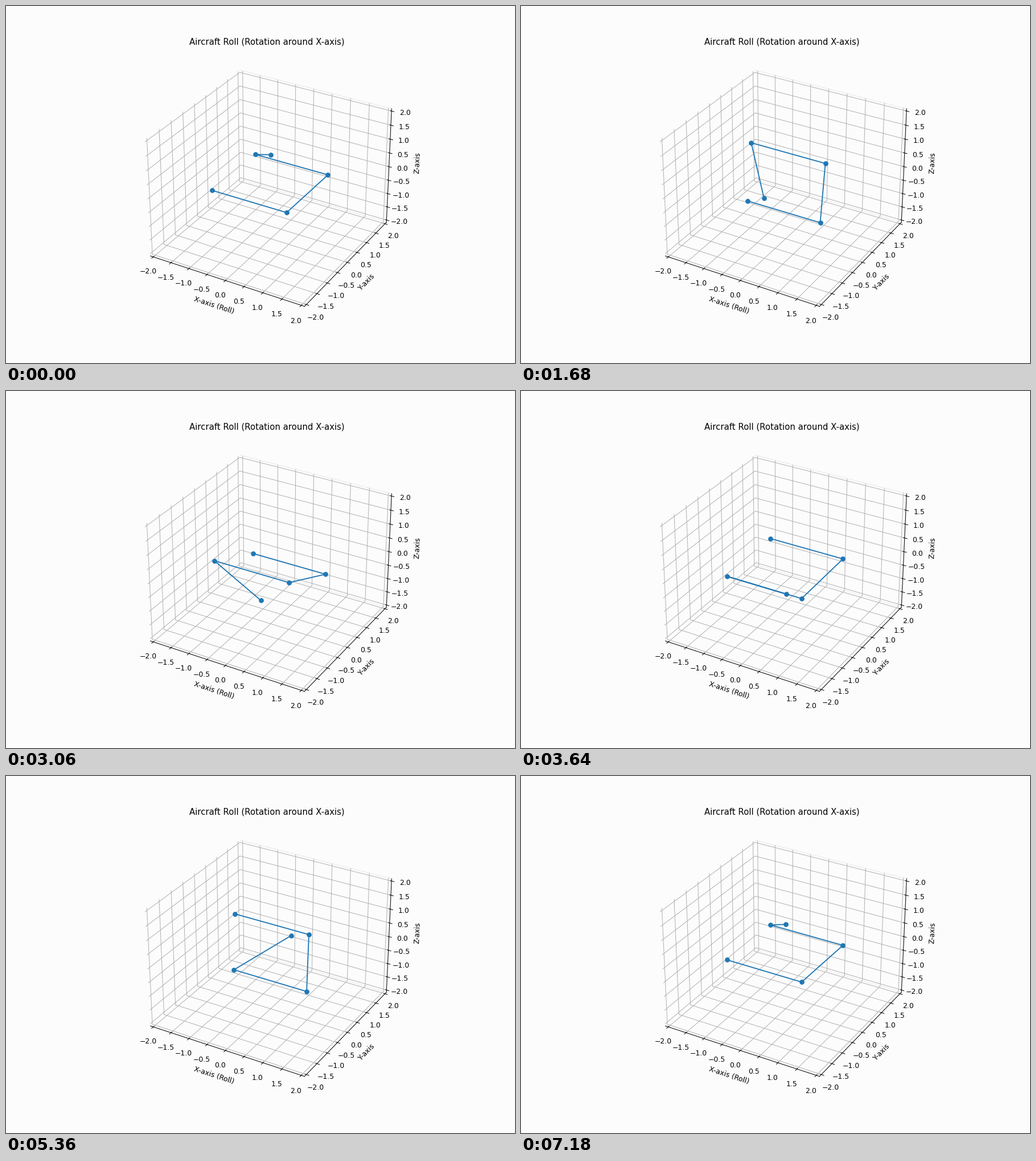
A matplotlib script for the animation above (7.2 s loop, 894 by 626 pixels).

```python
import matplotlib.pyplot as plt
import numpy as np
from matplotlib.animation import FuncAnimation

FRAMES, INTERVAL = 360, 20
BG = "#fcfcfc"
LIMIT = 2 * 25 / 24  # small margin beyond the outermost ticks

# Flat wing outline followed by the tip of the vertical fin
SHAPE_X = np.array([-1, 1, 1, -1, 0])
SHAPE_Y = np.array([-1, -1, 1, 1, 0])
SHAPE_Z = np.array([0, 0, 0, 0, 1])


def style_axes(ax):
    ticks = np.arange(-2, 2.1, 0.5)
    span = (-LIMIT, LIMIT)
    ax.set(xticks=ticks, yticks=ticks, zticks=ticks,
           xlim=span, ylim=span, zlim=span,
           xlabel="X-axis (Roll)", ylabel="Y-axis", zlabel="Z-axis")
    ax.set_title("Aircraft Roll (Rotation around X-axis)")
    ax.patch.set_visible(False)
    edges = (BG, "#ececec", "#f2f2f2")
    for axis, edge in zip((ax.xaxis, ax.yaxis, ax.zaxis), edges):
        axis.pane.set_alpha(1)
        axis.pane.set_facecolor(BG)
        axis.pane.set_edgecolor(edge)


def freeze_backdrop(fig, ax):
    """Render the static axes once and reuse them as a backdrop."""
    fig.canvas.draw()
    backdrop = np.array(fig.canvas.buffer_rgba())
    fig.figimage(backdrop, origin="upper", zorder=-1)
    ax.set_title("")
    ax.set_axis_off()


def roll(angle):
    c, s = np.cos(angle), np.sin(angle)
    return SHAPE_X, SHAPE_Y * c - SHAPE_Z * s, SHAPE_Y * s + SHAPE_Z * c


def update(frame):
    line.set_data_3d(*roll(np.radians(frame * 360 / FRAMES)))
    return (line,)


plt.rcParams["font.family"] = "DejaVu Sans"
fig = plt.figure(figsize=(10.0002, 7.0025), dpi=89.4, facecolor=BG)
ax = fig.add_subplot(projection="3d")
style_axes(ax)
freeze_backdrop(fig, ax)

line, = ax.plot(*roll(0), "o-", color="#1f77b4")

anim = FuncAnimation(fig, update, frames=FRAMES, interval=INTERVAL,
                     repeat=True, repeat_delay=0, blit=False)
plt.show()
```
